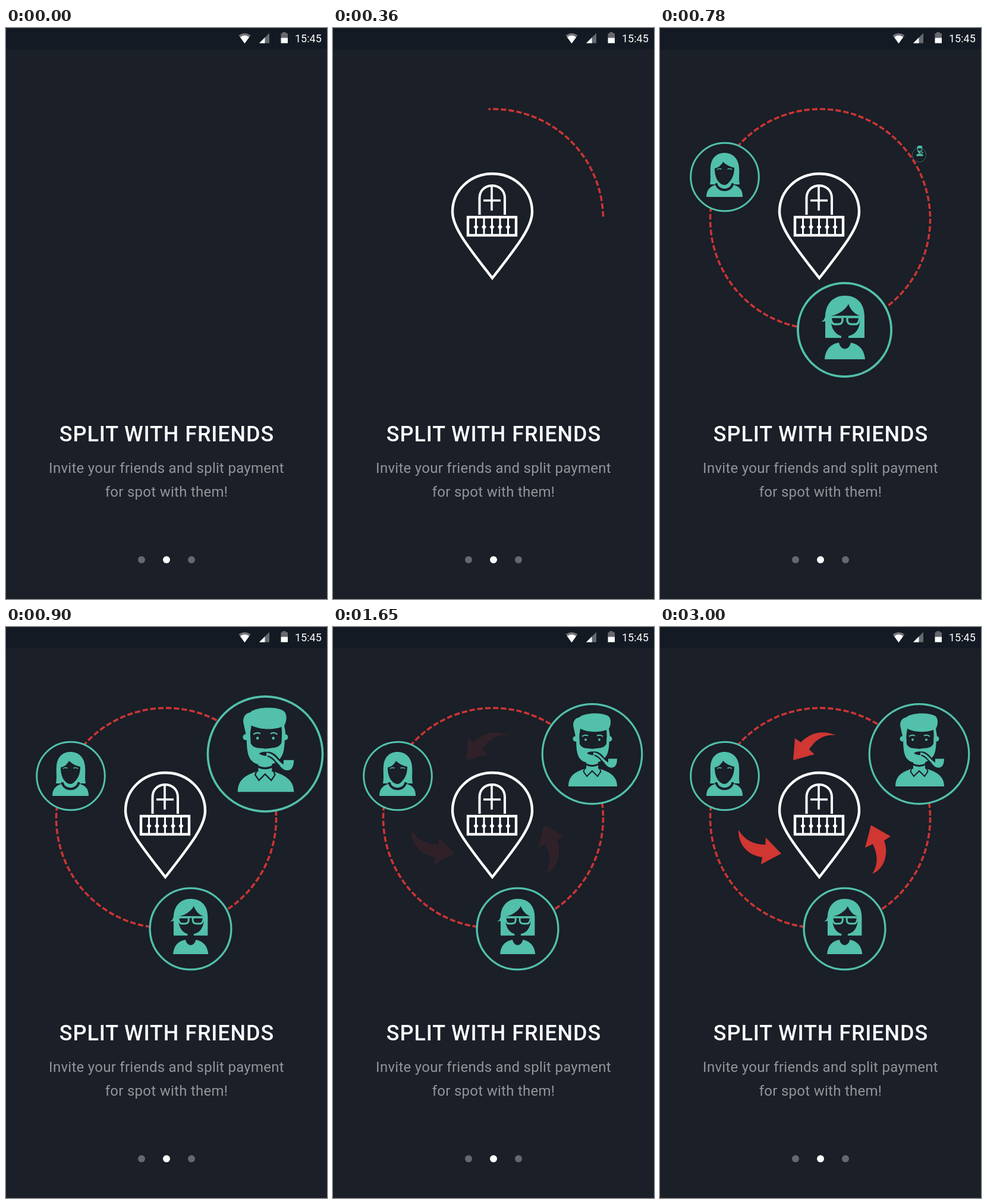
Write an HTML page that moves like this. It is 540x960 px and loops after 4590 ms.

```html
<!DOCTYPE html>
<html lang="en">
<head>
<meta charset="utf-8">
<title>Split with friends</title>
<style>
  html, body { margin: 0; width: 100%; height: 100%; overflow: hidden; background: #1a1f28; }
  svg { display: block; width: 100vw; height: 100vh; font-family: Roboto, sans-serif; }
  .teal { fill: #52c0ab; }
  .dark { fill: #1a1f28; }
  .line { fill: none; stroke: #52c0ab; }
  .cut { fill: none; stroke: #1a1f28; }
  .rim { fill: #1a1f28; stroke: #52c0ab; }
</style>
</head>
<body>
<svg viewBox="0 0 540 960">
  <rect width="540" height="960" fill="#1a1f28"/>

  <!-- status bar -->
  <rect width="540" height="36" fill="#141a23"/>
  <g fill="#fff">
    <path d="M401.5 26L391.5 12.3Q401.5 5 411.5 12.3Z" opacity=".4"/>
    <path d="M401.5 26L393.9 15.6Q401.5 9.6 409.1 15.6Z"/>
    <path d="M443 8.5V25.5H426Z" opacity=".35"/>
    <path d="M435.5 16V25.5H426Z"/>
    <path d="M462.5 16.5V9H465V7H471V9H474V16.5Z" opacity=".35"/>
    <path d="M462.5 16.5H474V25.5H462.5Z"/>
    <text x="486" y="24" font-size="18">15:45</text>
  </g>

  <!-- copy and pager -->
  <g fill="#fff" text-anchor="middle">
    <text x="270.5" y="695" font-size="36" font-weight="500" letter-spacing=".9">SPLIT WITH FRIENDS</text>
    <g font-size="24" letter-spacing=".27" fill="#929599">
      <text x="270" y="748">Invite your friends and split payment</text>
      <text x="270" y="788">for spot with them!</text>
    </g>
  </g>
  <circle cx="228" cy="894" r="6" fill="#65696e"/>
  <circle cx="270" cy="894" r="6" fill="#fff"/>
  <circle cx="312" cy="894" r="6" fill="#65696e"/>

  <path id="ring" fill="none" stroke="#cb3532" stroke-width="3.6" stroke-dasharray="9.3 3.91"/>

  <g id="pin" fill="none" stroke="#fff" stroke-width="4.4">
    <path d="M268 245C305 245 335 273 335 309C335 334 313 363 268 420.5C223 363 201 334 201 309C201 273 231 245 268 245Z"/>
    <path d="M246.5 314V286C246.5 258 289 258 289 286V314" stroke-width="4"/>
    <path d="M267 265V307M253 290H282" stroke-width="3.6"/>
    <rect x="227" y="318" width="81" height="30.5"/>
    <path id="bars" stroke-width="3"/>
    <path id="knobs" fill="#fff" stroke="none"/>
  </g>

  <!-- long hair -->
  <g id="rimA"><circle class="rim" cx="109" cy="250.5" r="57.3" stroke-width="3"/></g>
  <g id="faceA">
    <path class="teal" d="M84 263C86 251 84 244 85 234C86 219 95 210 108 210C123 210 132 220 133 235C134 246 132 254 134 263Z"/>
    <path class="teal" d="M78 284C78 272 84 266 96 263H121C134 266 139 272 139 284Z"/>
    <path class="cut" d="M94.5 261C97 276 120 276 122.5 261" stroke-width="4"/>
    <path class="teal" d="M98 257H120V262C117 270.5 101 270.5 98 262Z"/>
    <path class="dark" d="M92 236C98 235 103 231 106 225C112 231 118 233 125 235C125 245 122 252 119 256C115 261 112 264 108.500 264C104 264 99 260 96 255C93 249 92 243 92 236Z"/>
    <path class="line" d="M96 238Q100 235.500 103.500 237.500M113.500 237.500Q117 235.500 121 238" stroke-width="1.5"/>
  </g>

  <!-- glasses -->
  <g id="rimB"><circle class="rim" cx="310.5" cy="507.5" r="68.4" stroke-width="3.3"/></g>
  <g id="faceB">
    <path class="teal" d="M278 521V493L271 494Q277 491 278 484C279 463 292 450 311 450C331 450 344 463 344 485V521Z"/>
    <path class="dark" d="M287 484C300 482 312 474 317 464C321 475 329 482 337 484C337 505 330 515 317 518V532H305V518C293 514 287 504 287 484Z"/>
    <path class="teal" d="M277 557C278 540 288 531 301 529C304 543 318 543 321 529C336 532 344 542 345 557Z"/>
    <path class="line" d="M283 485.500H339" stroke-width="3.5"/>
    <path class="line" d="M287 486H307V492Q306 498 300 498H294Q288 498 287 486ZM315 486H336Q335 498 329 498H322Q316 498 315 492Z" stroke-width="3.4"/>
  </g>

  <!-- beard and pipe -->
  <g id="rimC"><circle class="rim" cx="436" cy="213.5" r="83.8" stroke-width="3.2"/></g>
  <g id="faceC">
    <path class="teal" d="M408 184L405 170C402 160 407 153 414 152C422 144 450 143 462 149C469 153 468 165 464 171L466 184H461L460 173C445 178 428 177 416 171L414 184Z"/>
    <circle class="teal" cx="408" cy="188" r="4.5"/>
    <circle class="teal" cx="465" cy="188" r="4.5"/>
    <path class="teal" d="M426 222H446V239L436 243L426 239Z"/>
    <path class="cut" d="M424 230Q436 237 448 230" stroke-width="3"/>
    <path class="teal" d="M409 176H414L415 197C420 206 428 203 436 205C446 203 456 205 460 196L461 176H465C465 200 464 213 458 219C450 231 424 232 416 222C409 214 409 200 409 176Z"/>
    <path class="dark" d="M427 212C432 208 440 209 447 211C441 216 434 217 427 212Z"/>
    <path class="line" d="M419 184Q424 180 429 183M444 183Q449 180 454 184" stroke-width="2"/>
    <circle class="teal" cx="425" cy="189.500" r="2"/>
    <circle class="teal" cx="448" cy="189.500" r="2"/>
    <path class="cut" d="M440 213C452 214 455 230 465 230" stroke-width="8"/>
    <path class="line" d="M438 212.500C452 214 455 230 465 230" stroke-width="3.6"/>
    <path class="teal" d="M463 221.500H478C478 232 474 237 468 236.500C463 236 460 233 457 229L463 228Z"/>
    <path class="teal" d="M396 268C396 251 406 244 424 238L436 242L448 238C466 244 478 251 478 268Z"/>
    <path class="cut" d="M424 236L421.500 243L427 251L436 242L445 251L450.500 243L448 236" stroke-width="2"/>
  </g>

  <g id="arrows" fill="#d03632">
    <path d="M296 182C275 173 252 177 237 194L227 187L224 224L260 214L251 206C262 188 277 180 296 182Z"/>
    <path d="M132 341C131 363 146 384 172 387L170 399L204 381L178 354L177 366C158 366 142 358 132 341Z"/>
    <path d="M357 415C378 407 385 380 377 359L388 352L355 333L345 371L358 365C367 384 367 400 357 415Z"/>
  </g>
</svg>
<script>
const LOOP = 4590, STEP = 30;
const $ = id => document.getElementById(id);
const clamp = v => Math.min(1, Math.max(0, v));
const phase = (t, start, length) => clamp((t - start) / length);
const smooth = p => (1 - Math.cos(Math.PI * p)) / 2;

// rises past 1 by about 15 %, then settles
function overshoot(p) {
  const u = p - 1;
  return u * u * (3.2 * u + 2.2) + 1;
}

// unit: size of the drawing at rest
const pops = [
  { id: 'pin', x: 268, y: 333, start: 15, length: 300 },
  { id: 'rimA', x: 109, y: 250.5, start: 495, length: 209 },
  { id: 'faceA', x: 108.5, y: 247, start: 495, length: 209 },
  { id: 'rimB', x: 310.5, y: 507.5, start: 623, length: 265 },
  { id: 'faceB', x: 308.5, y: 503.5, start: 623, length: 265, unit: 0.87 },
  { id: 'rimC', x: 436, y: 213.5, start: 773, length: 247 },
  { id: 'faceC', x: 437, y: 206.5, start: 773, length: 247 }
];

function pop({ id, x, y, start, length, unit = 1 }, t) {
  const s = unit * overshoot(phase(t, start, length));
  const el = $(id);
  el.style.display = s > 0.001 ? '' : 'none';
  el.setAttribute('transform', `translate(${x} ${y}) scale(${s}) translate(${-x} ${-y})`);
}

// counter-clockwise arc from the right-hand side
function arc(sweep) {
  if (sweep <= 0) return '';
  const cx = 269.5, cy = 321.3, r = 185, first = 1.3;
  const at = deg => {
    const a = deg * Math.PI / 180;
    return `${cx + r * Math.cos(a)} ${cy - r * Math.sin(a)}`;
  };
  const end = Math.min(sweep, 359.99);
  return `M${at(first)}A${r} ${r} 0 ${end > 180 ? 1 : 0} 0 ${at(first + end)}`;
}

const posts = [0, 1, 2, 3, 4].map(i => 240.5 + i * 13.5);
$('bars').setAttribute('d', posts.map(x => `M${x} 318V348`).join(''));
$('knobs').setAttribute('d', posts.map(x => `M${x - 4} 334.5l4 -5l4 5l-4 5z`).join(''));

function draw(t) {
  $('ring').setAttribute('d', arc(360 * smooth(phase(t, 136, 667))));
  pops.forEach(p => pop(p, t));
  $('arrows').setAttribute('opacity', phase(t, 1470, 1530));
}

const origin = performance.now();
function tick() {
  const t = (performance.now() - origin) % LOOP;
  draw(Math.floor(t / STEP) * STEP);
  requestAnimationFrame(tick);
}
draw(0);
requestAnimationFrame(tick);
</script>
</body>
</html>
```
